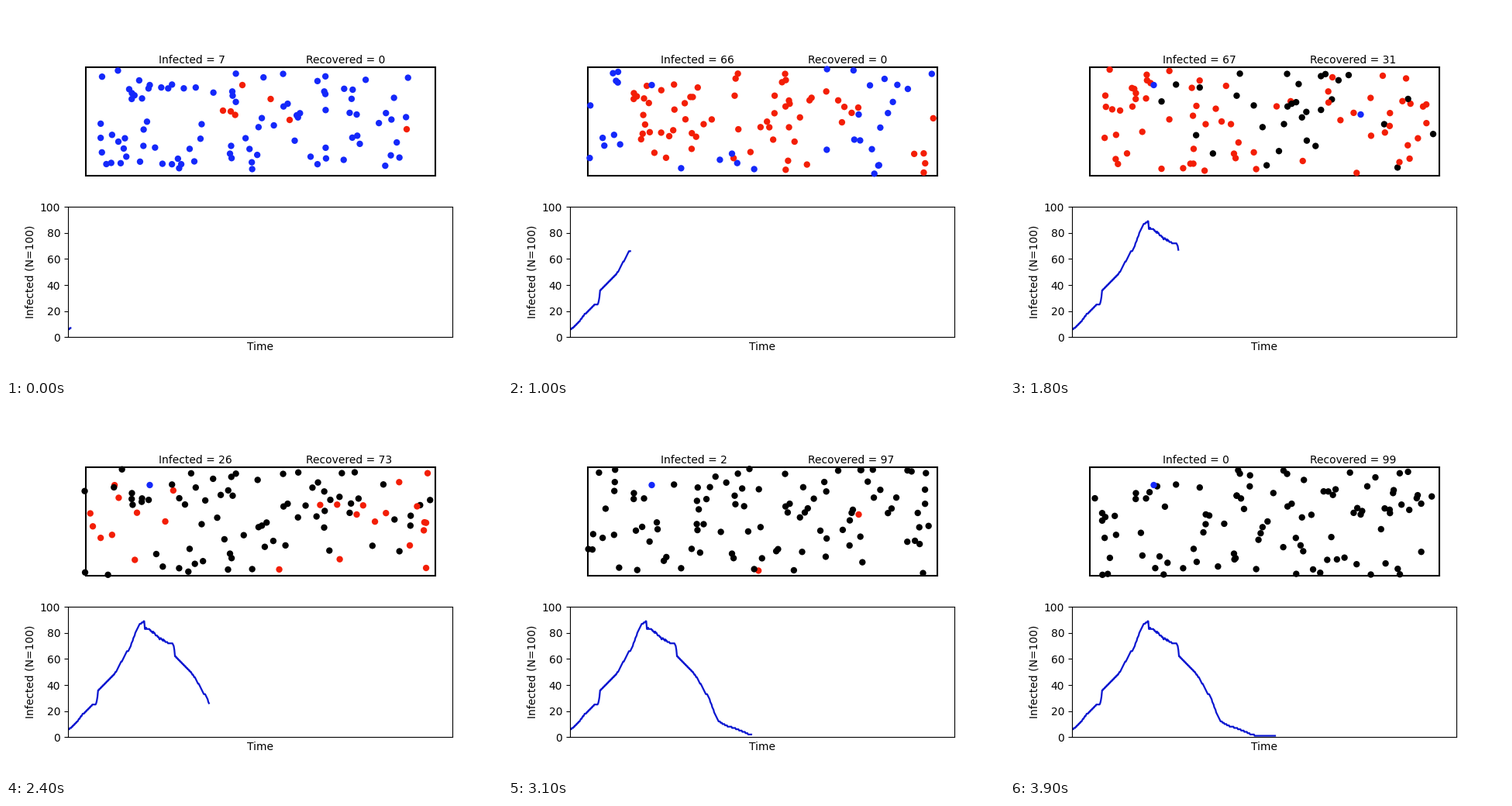
A matplotlib script for the animation above (4 s loop, 640x480 px).

```python
import numpy as np
import matplotlib.pyplot as plt
from matplotlib.animation import FuncAnimation
from matplotlib.patches import Rectangle

FRAMES = 40
STEPS_PER_FRAME = 9
FIRST_STEP = 4
LAST_STEP = FIRST_STEP + STEPS_PER_FRAME * (FRAMES - 1)

PEOPLE = 100
STAY_HOME = 25
ILL_STEPS = 120
NEVER = 10 ** 6

BLUE, RED, BLACK = "#1428fa", "#f31e06", "#000000"
LINE = "#0a16d0"

# Walls for the moving dots, in stage pixels (y points down)
LOW = np.array([101, 81])
HIGH = np.array([549, 218])

# The first carriers, and two isolated people: the last one caught, one never
CARRIERS = [(305, 102), (341.5, 120), (280, 135), (290, 136),
            (366, 147), (517, 159)]
ISOLATED = [(452.5, 140), (185.5, 102)]

# Key points of the outbreak: step and total infected so far
KEYS = [(0, 6), (3, 7), (12, 11), (23, 18), (38, 25), (44, 26), (46, 31),
        (47, 36), (74, 50), (92, 66), (95, 67), (105, 80), (112, 87),
        (118, 89), (126, 91), (139, 93), (158, 97), (165, 98), (198, 99)]

rng = np.random.default_rng(12)
crowd = PEOPLE - len(CARRIERS) - len(ISOLATED)
start = np.vstack([CARRIERS,
                   rng.uniform((121, 82), (540, 211), (crowd, 2)),
                   ISOLATED])
heading = rng.uniform(0, 2 * np.pi, PEOPLE)
speed = rng.uniform(0.5, 0.75, PEOPLE)
speed[-STAY_HOME:] = 0
velocity = np.column_stack([np.cos(heading), np.sin(heading)]) * speed[:, None]


def positions(step):
    """All dots at a step; walkers bounce off the walls."""
    span = HIGH - LOW
    way = (start - LOW + velocity * (step - FIRST_STEP)) % (2 * span)
    return LOW + span - np.abs(way - span)


def infection_steps():
    """Step at which each dot turns red; the nearest to an ill one is next."""
    key_steps, key_totals = zip(*KEYS)
    ranks = np.arange(len(CARRIERS) + 1, PEOPLE)
    events = np.ceil(np.interp(ranks, key_totals, key_steps)).astype(int)

    distance_kept = np.zeros(PEOPLE)
    distance_kept[-2:] = 1000, 2000
    caught = np.full(PEOPLE, NEVER)
    caught[:len(CARRIERS)] = 0
    for step in events:
        spots = positions(step)
        ill = spots[(caught <= step) & (step < caught + ILL_STEPS)]
        gap = np.linalg.norm(spots[:, None] - ill, axis=2).min(axis=1)
        gap += distance_kept
        gap[caught < NEVER] = np.inf
        caught[gap.argmin()] = step
    return caught


caught = infection_steps()
steps = np.arange(LAST_STEP + 1)
total = (caught[:, None] <= steps).sum(axis=0)
recovered = (caught[:, None] + ILL_STEPS <= steps).sum(axis=0)
infected = total - recovered
curve_y = np.where(infected > 0, infected, np.nan)

fig, (room, chart) = plt.subplots(2, 1, figsize=(6.4, 4.8), dpi=100)
fig.subplots_adjust(left=0.125, right=0.9, bottom=0.11, top=0.88, hspace=0.2)

room.set_xlim(80, 576)
room.set_ylim(225.6, 57.6)
room.axis("off")
room.add_patch(Rectangle((102.5, 78.6), 451, 140, fill=False, lw=1.5))
dots = room.scatter(*start.T, s=36, linewidths=0, zorder=3, clip_on=False)
infected_text = room.text(197, 74, "")
recovered_text = room.text(387, 74, "")

chart.set_xlim(0, 600)
chart.set_ylim(0, 100)
chart.set_xticks([])
chart.set_xlabel("Time")
chart.set_ylabel("Infected (N=100)")
curve, = chart.plot([], [], color=LINE, lw=1.6)


def update(frame):
    step = FIRST_STEP + STEPS_PER_FRAME * frame
    dots.set_offsets(positions(step))
    dots.set_facecolor([
        BLUE if step < c else RED if step < c + ILL_STEPS else BLACK
        for c in caught])
    curve.set_data(steps[:step + 1], curve_y[:step + 1])
    infected_text.set_text(f"Infected = {infected[step]}")
    recovered_text.set_text(f"Recovered = {recovered[step]}")
    return dots, curve, infected_text, recovered_text


anim = FuncAnimation(fig, update, frames=FRAMES, interval=100, repeat=True)
plt.show()
```
